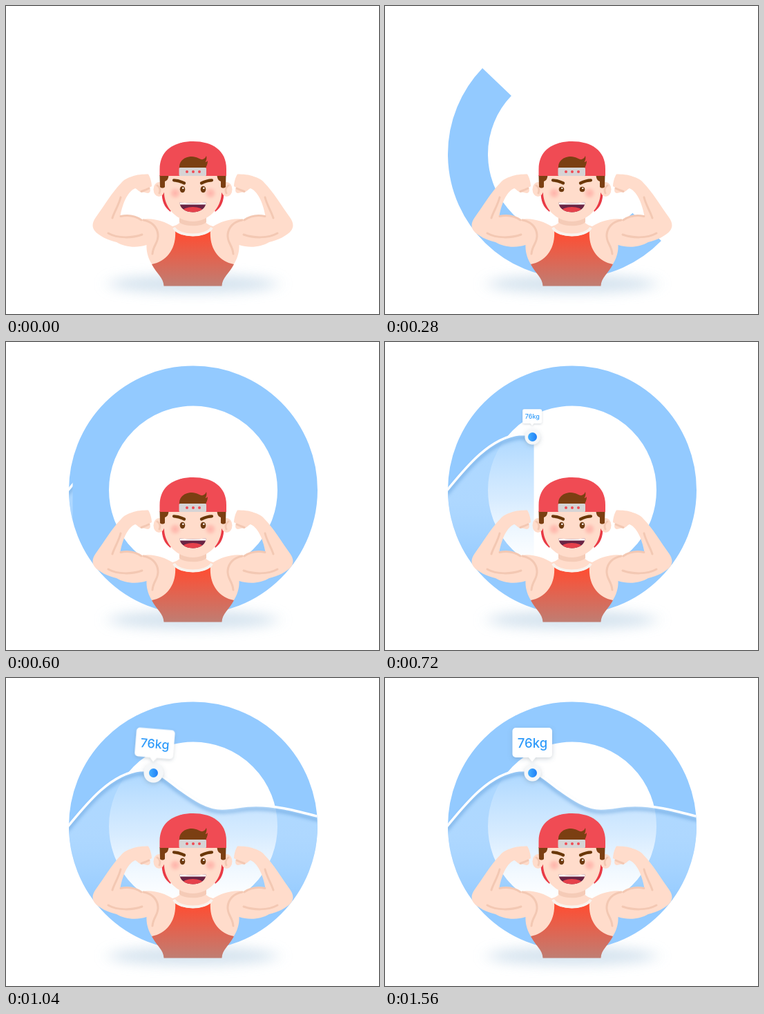
Write an HTML page that moves like this. It is 540 px wide and 446 px high and loops after 1.64 s.

```html
<!DOCTYPE html>
<html lang="en">
<head>
<meta charset="utf-8">
<title>Weight tracker</title>
<style>
  html, body { margin: 0; width: 100%; height: 100%; overflow: hidden; background: #fff; }
  svg { display: block; width: 100vw; height: 100vh; }
  text { font: 500 18.5px Inter, Roboto, sans-serif; fill: #2f9bfa; text-anchor: middle; }
  .crease { fill: none; stroke: #f3c8b3; stroke-width: 3; stroke-linecap: round; stroke-linejoin: round; }
</style>
</head>
<body>
<svg viewBox="0 0 540 446">
  <defs>
    <linearGradient id="vest" x1="0" y1="328" x2="0" y2="405" gradientUnits="userSpaceOnUse">
      <stop stop-color="#ff4d32"/><stop offset="1" stop-color="#c07d72"/>
    </linearGradient>
    <linearGradient id="area" x1="0" y1="130" x2="0" y2="325" gradientUnits="userSpaceOnUse">
      <stop stop-color="#a9d6ff"/><stop offset=".5" stop-color="#bfe0ff" stop-opacity=".62"/>
      <stop offset="1" stop-color="#d8edff" stop-opacity="0"/>
    </linearGradient>
    <linearGradient id="bead">
      <stop stop-color="#45b0ff"/><stop offset="1" stop-color="#1f7ff6"/>
    </linearGradient>
    <radialGradient id="blush">
      <stop stop-color="#ffb4ab"/><stop offset=".4" stop-color="#ffbcb0" stop-opacity=".75"/>
      <stop offset="1" stop-color="#ffdccb" stop-opacity="0"/>
    </radialGradient>
    <filter id="floorBlur" x="-30%" y="-150%" width="160%" height="400%"><feGaussianBlur stdDeviation="12 9"/></filter>
    <filter id="lineBlur" x="-10%" y="-30%" width="120%" height="160%"><feGaussianBlur stdDeviation="2.5"/></filter>
    <filter id="drop" x="-40%" y="-40%" width="180%" height="190%">
      <feDropShadow dx="0" dy="2" stdDeviation="3" flood-color="#53687c" flood-opacity=".28"/>
    </filter>
    <clipPath id="disc"><circle cx="271" cy="214.5" r="180"/></clipPath>
    <clipPath id="wipe"><rect id="wipeRect" x="88" y="90" width="0" height="320"/></clipPath>
    <clipPath id="mouth"><path d="M251.500 284.500Q270.500 286.500 289.500 284.500C289.500 293 281 298.500 270.500 298.500S251.500 293 251.500 284.500Z"/></clipPath>
    <path id="curve" d="M88 217C118 180 152 138 196 133.500C221 133.500 232 147 250 160C270 174 290 189 313 189C332 189 340 184.500 362 184.500C392 184.500 422 193 454 201"/>

    <g id="arm">
      <path fill="#ffdccb" d="M182 247C189 244 198 243.500 206 243.500C209 248 211 256 211 261L207.500 263C210 266 209 270 206 271C203 271 200 269 196 269.500C192 269 190 265 187 264C177 268 169 284 165.500 304C176 302 187 303 197 309C212 306 230 312 241 319L252 320L246 372L212 375C206 366 203 356 203.500 346C188 351 172 349 160 342C148 339 134 333 128 325C124 319 125 313 130 306C141 291 154 269 167 256C171 251 176 249 182 247Z"/>
      <path class="crease" d="M166 277C163 289 157 297 154 307"/>
      <path class="crease" d="M148 329C162 337 183 336 197 331"/>
      <path class="crease" d="M166 304.500C178 302 189 305 196 310"/>
      <path class="crease" d="M199 310C211 312 219 320 220 331C221 343 213 346 212 359"/>
      <path class="crease" stroke-width="2" d="M196 268.500C200 267 203 266 207 264"/>
    </g>
    <g id="side">
      <path fill="#e93a45" d="M225.500 268C225.500 283 229 291 238 298L246 280Z"/>
      <ellipse cx="221.500" cy="265.500" rx="8" ry="10.500" fill="#ffdccb"/>
      <path class="crease" stroke-width="2" d="M219 260C223 262 224 267 222 271"/>
    </g>
    <g id="temple">
      <path fill="#7b3f12" d="M222.500 245H235.500C235 251 233 253 230 254V262C228 264 225 264 223 262Z"/>
      <circle cx="245" cy="271" r="11.500" fill="url(#blush)"/>
      <path d="M243 252.300C249 252.500 254 254.500 258 256.500" fill="none" stroke="#693708" stroke-width="4.200" stroke-linecap="round"/>
    </g>
    <g id="eye">
      <ellipse rx="3.800" ry="4.800" fill="#6d3a10"/>
      <circle cx=".8" cy="-1.800" r="1.300" fill="#fff"/>
    </g>
  </defs>

  <rect width="540" height="446" fill="#fff"/>
  <ellipse cx="271" cy="402.500" rx="122" ry="13" fill="#cfdfec" opacity=".88" filter="url(#floorBlur)"/>

  <circle id="ring" cx="271" cy="214.5" r="151" fill="none" stroke="#93caff" stroke-width="58" pathLength="360"/>

  <g clip-path="url(#disc)"><g clip-path="url(#wipe)">
    <path id="fill" fill="url(#area)"/>
    <use href="#curve" y="5" fill="none" stroke="#3f86cc" stroke-width="4" opacity=".5" filter="url(#lineBlur)"/>
    <use href="#curve" fill="none" stroke="#fff" stroke-width="3.500"/>
  </g></g>

  <circle id="halo" cx="213.5" cy="137.500" fill="#f5f7f9" filter="url(#drop)"/>
  <circle id="dot" cx="213.5" cy="137.500" fill="url(#bead)"/>
  <g id="tip">
    <path fill="#fff" filter="url(#drop)" d="M-23.500 -49H24A5 5 0 0 1 29 -44V-11A5 5 0 0 1 24 -6H5L0 0L-5 -6H-23.500A5 5 0 0 1 -28.500 -11V-44A5 5 0 0 1 -23.500 -49Z"/>
    <text x=".5" y="-20">76kg</text>
  </g>

  <path fill="#ffdccb" d="M252 302H289V313C293 318 300 319 305 320L328 374H213L236 320C241 319 248 318 252 313Z"/>
  <use href="#arm"/>
  <use href="#arm" transform="translate(541) scale(-1 1)"/>
  <path fill="url(#vest)" d="M245 325C255 336 286 336 296 325C294 351 308 370 330 374C323 388 313 393 312.500 405.500H228.500C228 393 218 388 211 374C233 370 247 351 245 325Z"/>
  <path fill="#ffdccb" d="M245 319H296C290 334 251 334 245 319Z"/>
  <path d="M243 321C251 335 290 335 298 321" fill="none" stroke="#f8f3ee" stroke-width="4"/>
  <path fill="#f5cbb7" d="M251 303H290V313C284 320 257 320 251 313Z"/>

  <use href="#side"/>
  <use href="#side" transform="translate(541) scale(-1 1)"/>
  <path fill="#ffdccb" d="M227.500 243H313.500L312 272C311 292 294 312 270.500 312S230 292 229 272Z"/>
  <use href="#temple"/>
  <use href="#temple" transform="translate(541) scale(-1 1)"/>
  <path fill="#f04b54" d="M222.500 246V236C222.500 209 243 196 270.800 196S319 209 319 236V246Z"/>
  <path fill="#7b3f12" d="M251 235C250 225 258 218 269 218C277 218 281 223 285 222C288 221 289 219 290 217C291 221 290 224 288.500 226C290 226 291 225 292 224C292 229 290 232 289 235Z"/>
  <rect x="250.5" y="234" width="39.5" height="12" rx="1.500" fill="#d6d4d5"/>
  <g fill="#f04b54"><circle cx="262" cy="240" r="2"/><circle cx="271" cy="240" r="2"/><circle cx="280" cy="240" r="2"/></g>

  <use class="eye" href="#eye" data-x="255.5"/>
  <use class="eye" href="#eye" data-x="285.5"/>
  <g clip-path="url(#mouth)">
    <rect x="250" y="283" width="41" height="17" fill="#6a2444"/>
    <rect x="250" y="283" width="41" height="4.500" fill="#fff"/>
    <ellipse cx="270.5" cy="297" rx="15" ry="6" fill="#e5414b"/>
  </g>
</svg>
<script>
  const LOOP = 1640, STEP = 40;
  const $ = id => document.getElementById(id);
  const set = (el, name, value) => el.setAttribute(name, value);
  const clamp = v => Math.min(1, Math.max(0, v));

  // cubic-bezier(bend, 0, bend, 1), solved by bisection
  function ease(x, bend) {
    let lo = 0, hi = 1;
    for (let i = 0; i < 24; i++) {
      const s = (lo + hi) / 2;
      if (3 * bend * s * (1 - s) + s ** 3 < x) lo = s; else hi = s;
    }
    return lo * lo * (3 - 2 * lo);
  }
  const span = (t, from, to, bend = .612) => {
    const p = clamp((t - from) / (to - from));
    return p === 0 || p === 1 ? p : ease(p, bend);
  };

  // Sine-eased interpolation through [time, value] pairs
  function track(t, keys) {
    if (t <= keys[0][0]) return keys[0][1];
    for (let i = 1; i < keys.length; i++) {
      const [t0, a] = keys[i - 1], [t1, b] = keys[i];
      if (t <= t1) return a + (b - a) * (1 - Math.cos(Math.PI * (t - t0) / (t1 - t0))) / 2;
    }
    return keys[keys.length - 1][1];
  }

  const SCALE = [[600, 0], [880, 1.25], [1040, .97], [1120, 1]];
  const SWING = [[1000, 0], [1080, 9.5], [1200, -9.5], [1320, 9.5], [1440, -9.5], [1560, 0]];
  const HALO = [[600, 0], [720, 11], [1040, 14], [1560, 12]];
  const DOT = [[600, 0], [720, 6.5]];
  const BLINK = [[240, 1], [360, .1], [480, 1]];

  const ring = $('ring'), wipe = $('wipeRect'), tip = $('tip'), halo = $('halo'), dot = $('dot');
  const eyes = document.querySelectorAll('.eye');
  set($('fill'), 'd', $('curve').getAttribute('d') + 'V400H88Z');

  function draw(t) {
    const sweep = 360 * span(t, 0, 480);
    set(ring, 'stroke-dasharray', sweep >= 360 ? 'none' : `${sweep} 360`);
    set(ring, 'transform', `rotate(${360 * span(t, 0, 560, .589) - 90} 271 214.5)`);
    set(ring, 'visibility', sweep > 0 ? 'visible' : 'hidden');

    const reveal = span(t, 560, 880);
    set(wipe, 'width', reveal && 3 + 362 * reveal);

    set(halo, 'r', track(t, HALO));
    set(dot, 'r', track(t, DOT));
    const size = track(t, SCALE);
    set(tip, 'visibility', size > 0 ? 'visible' : 'hidden');
    set(tip, 'transform', `translate(213 121) rotate(${track(t, SWING)}) scale(${size})`);

    const lid = track(t, BLINK);
    eyes.forEach(eye => set(eye, 'transform', `translate(${eye.dataset.x} 265.5) scale(1 ${lid})`));
  }

  const start = performance.now();
  function tick() {
    const t = (performance.now() - start) % LOOP;
    draw(Math.min(Math.floor(t / STEP) * STEP, 1560));
    requestAnimationFrame(tick);
  }
  draw(0);
  requestAnimationFrame(tick);
</script>
</body>
</html>
```
